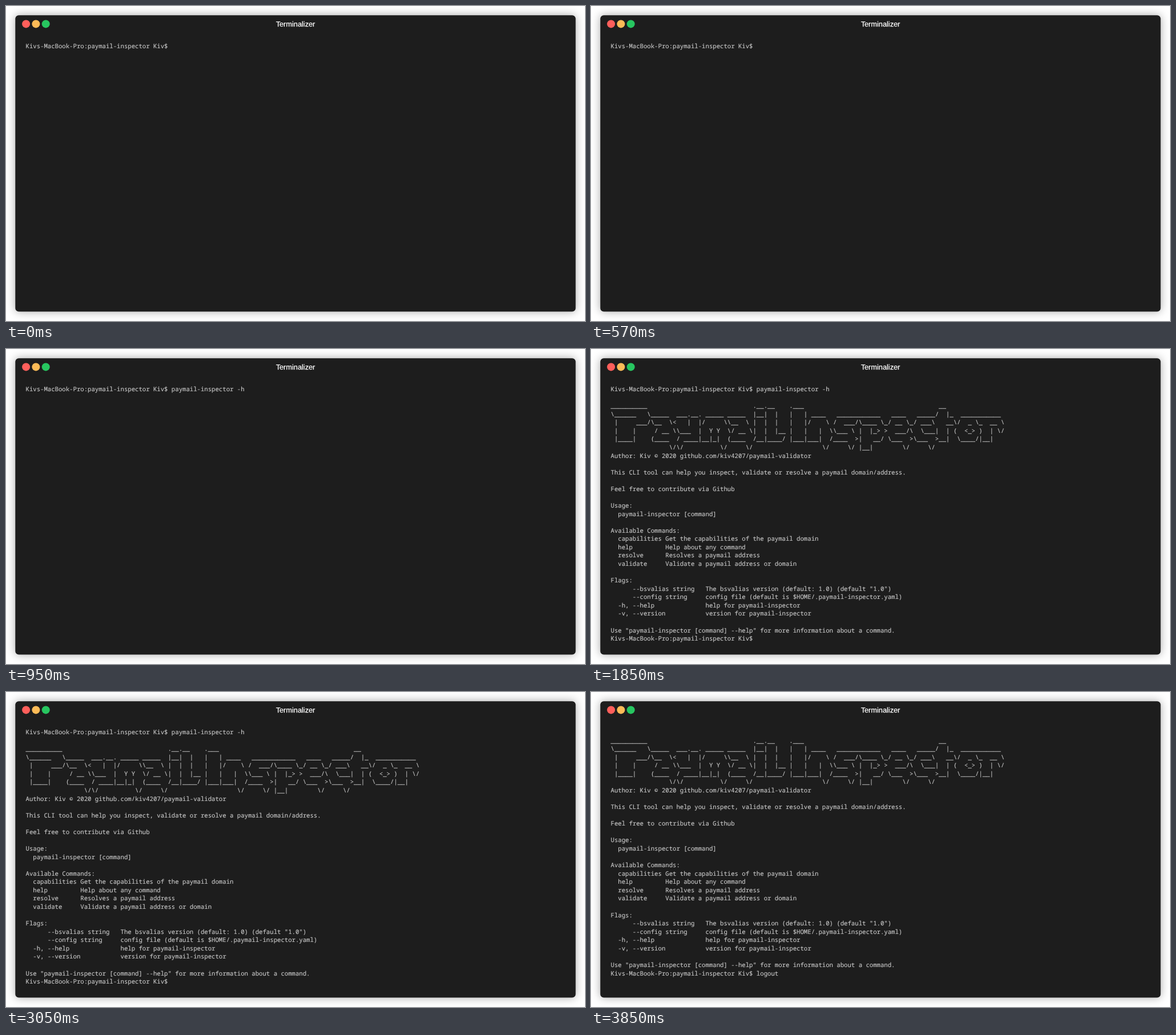
Write an HTML page that moves like this. It is 1014x552 px and loops after 4270 ms.

```html
<!DOCTYPE html>
<html lang="en">
<head>
<meta charset="utf-8">
<title>Terminal</title>
<style>
  html, body { margin: 0; width: 100%; height: 100%; overflow: hidden; background: #fff; }
  svg { display: block; width: 1014px; height: 552px; text-rendering: geometricPrecision; }
  .window { fill: #1d1d1d; filter: drop-shadow(0 0 8px rgba(0, 0, 0, .34)); }
  .title { font: 12.75px "Liberation Sans", Arial, sans-serif; fill: #fff; stroke: #fff; stroke-width: .25px; text-anchor: middle; }
  .line { font: 10.65px "Noto Sans Mono", monospace; fill: #c6c6c6; stroke: #c6c6c6; stroke-width: .15px; white-space: pre; }
</style>
</head>
<body>
<svg viewBox="0 0 1014 552">
  <rect class="window" x="16.3" y="16.3" width="981.3" height="519.3" rx="6"/>
  <circle cx="35.1" cy="31.4" r="7" fill="#ff5f5b"/>
  <circle cx="52.4" cy="31.4" r="7" fill="#fdbb57"/>
  <circle cx="69.7" cy="31.4" r="7" fill="#27c660"/>
  <text class="title" x="507" y="36.2">Terminalizer</text>
  <g id="screen"></g>
</svg>
<script>
const LOOP = 4270;
const ROWS = 32;
const LEFT = 34.5, BASELINE = 74, LINE_HEIGHT = 14.57;

const prompt = "Kivs-MacBook-Pro:paymail-inspector Kiv$";
const command = prompt + " paymail-inspector -h";

const help = String.raw`
__________                             .__.__    .___                                     __
\______   \_____  ___.__. _____ _____  |__|  |   |   | ____   ____________   ____   _____/  |_  ___________
 |     ___/\__  \<   |  |/     \\__  \ |  |  |   |   |/    \ /  ___/\____ \_/ __ \_/ ___\   __\/  _ \_  __ \
 |    |     / __ \\___  |  Y Y  \/ __ \|  |  |__ |   |   |  \\___ \ |  |_> >  ___/\  \___|  | (  <_> )  | \/
 |____|    (____  / ____|__|_|  (____  /__|____/ |___|___|  /____  >|   __/ \___  >\___  >__|  \____/|__|
                \/\/          \/     \/                   \/     \/ |__|        \/     \/
Author: Kiv © 2020 github.com/kiv4207/paymail-validator

This CLI tool can help you inspect, validate or resolve a paymail domain/address.

Feel free to contribute via Github

Usage:
  paymail-inspector [command]

Available Commands:
  capabilities Get the capabilities of the paymail domain
  help         Help about any command
  resolve      Resolves a paymail address
  validate     Validate a paymail address or domain

Flags:
      --bsvalias string   The bsvalias version (default: 1.0) (default "1.0")
      --config string     config file (default is $HOME/.paymail-inspector.yaml)
  -h, --help              help for paymail-inspector
  -v, --version           version for paymail-inspector

Use "paymail-inspector [command] --help" for more information about a command.`.split("\n");

const scenes = [
  { start: 0, lines: [prompt] },
  { start: 950, lines: [command] },
  { start: 1850, lines: [command, ...help, prompt] },
  { start: 3850, lines: [...help, prompt + " logout"] }
];

const screen = document.getElementById("screen");
const rows = Array.from({ length: ROWS }, (_, i) => {
  const row = document.createElementNS(screen.namespaceURI, "text");
  row.setAttribute("class", "line");
  row.setAttribute("x", LEFT);
  row.setAttribute("y", BASELINE + i * LINE_HEIGHT);
  return screen.appendChild(row);
});

let shown = null;

function render(time) {
  const scene = scenes.findLast(s => s.start <= time);
  if (scene === shown) return;
  shown = scene;
  rows.forEach((row, i) => { row.textContent = scene.lines[i] ?? ""; });
}

const begin = performance.now();

function tick() {
  render((performance.now() - begin) % LOOP);
  requestAnimationFrame(tick);
}
tick();
</script>
</body>
</html>
```
